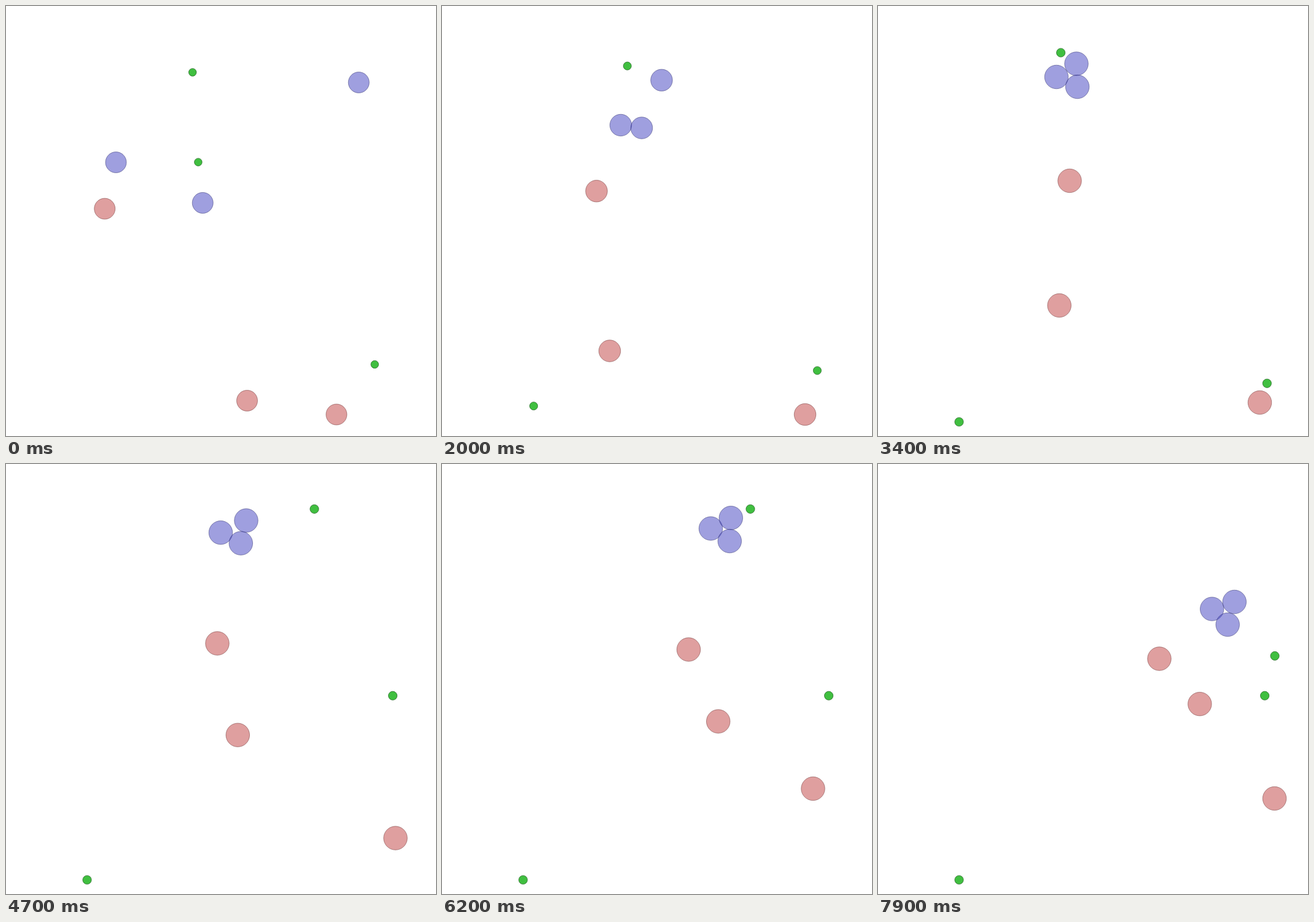
Recreate the animation shown at these times as an HTML page with a canvas. Size 700 px wide and 700 px high, loop 8000 ms.

```html
<!DOCTYPE html>
<html lang="en">
<head>
<meta charset="utf-8">
<title>Agents and landmarks</title>
<style>
  html, body { margin: 0; width: 100%; height: 100%; overflow: hidden; background: #fff; }
  canvas { display: block; width: 100vw; height: 100vh; }
</style>
</head>
<body>
<canvas id="stage" width="700" height="700"></canvas>
<script>
const LOOP = 8000, STEP = 100, MID = 350, REACH = 315;
const ctx = document.getElementById('stage').getContext('2d');

// Positions are pixels from the centre at full zoom.
const blueTimes = [0, 1200, 2000, 3400, 4100, 4700, 5400, 6200, 6600, 7200, 7900];
const redTimes = [0, 1200, 2000, 3400, 4700, 6200, 7900];
const driftTimes = [0, 900, 1200, 2000, 2700, 3400, 3600, 4500, 4700, 5400, 6200, 6600, 7200, 7900];

const BLUE = '64,64,191', RED = '191,64,64', GREEN = '64,191,64';

const agents = [
  { rgb: RED, t: redTimes,
    x: [-214.3, -160.9, -106.9, -38, -6, 51.5, 108],
    y: [-22.6, -42.7, -52.9, -65.5, -58, -48, -33] },
  { rgb: RED, t: redTimes,
    x: [48.1, -43.3, -83.6, -54.8, 27.3, 99.7, 173.8],
    y: [331.1, 278.8, 229.6, 137.5, 91.2, 69, 40.7] },
  { rgb: RED, t: driftTimes,
    x: [212.8, 232, 240.6, 261.7, 267, 271.5, 274.7, 284.7, 284, 270.7, 254, 256, 270, 295.5],
    y: [356.6, 333, 339, 342, 320.8, 295.5, 290.7, 268.7, 259, 217.7, 178.5, 174, 179, 194.5] },
  { rgb: BLUE, t: blueTimes,
    x: [-193.6, -81.8, -64.1, -59.5, -61.5, -0.5, 58, 87.5, 91, 136, 193.7],
    y: [-108.1, -104.7, -169.4, -234.5, -241, -238.3, -243, -245, -246, -191, -114] },
  { rgb: BLUE, t: blueTimes,
    x: [253.9, 61.9, 8.1, -27, -30.5, 41, 97, 120.3, 127, 171, 230.3],
    y: [-255.3, -249.4, -248.9, -256, -259, -258, -260.7, -262.2, -264, -204.7, -125.5] },
  { rgb: BLUE, t: blueTimes,
    x: [-33.7, -33.4, -27.1, -25.4, -26, 32.3, 89, 118.3, 122, 163, 219.2],
    y: [-33.4, -83.6, -164.5, -218.5, -222, -221, -223, -224.5, -226, -168, -88.5] }
];

// A landmark jumps elsewhere once an agent touches it.
const landmarks = [
  { from: 0, to: 4100, x: -52.4, y: -274 },
  { from: 0, to: 1200, x: -42, y: -108.5 },
  { from: 0, to: 3700, x: 283.3, y: 264.3 },
  { from: 1200, to: LOOP, x: -218, y: 327 },
  { from: 3700, to: LOOP, x: 279.6, y: 27.2 },
  { from: 4100, to: 6600, x: 152, y: -276.7 },
  { from: 6600, to: LOOP, x: 296, y: -37.6 }
];

const secant = (t, v, i) => (v[i + 1] - v[i]) / (t[i + 1] - t[i]);

function slope(t, v, i) {
  if (i === 0) return 0;
  if (i === t.length - 1) return secant(t, v, i - 1);
  const a = secant(t, v, i - 1), b = secant(t, v, i);
  if (a * b <= 0) return 0;
  const h = t[i] - t[i - 1], k = t[i + 1] - t[i];
  const mean = Math.abs((a * k + b * h) / (h + k));
  return Math.sign(a) * Math.min(mean, 2 * Math.abs(a), 2 * Math.abs(b));
}

// Monotone cubic through the keys
function sample(t, v, now) {
  let i = 0;
  while (i < t.length - 2 && now >= t[i + 1]) i++;
  const h = t[i + 1] - t[i], u = (now - t[i]) / h, w = 1 - u;
  return v[i] * (1 + 2 * u) * w * w + v[i + 1] * (3 - 2 * u) * u * u +
    h * u * w * (slope(t, v, i) * w - slope(t, v, i + 1) * u);
}

function disc(x, y, r, zoom, rgb, alpha, edge) {
  ctx.beginPath();
  ctx.arc(MID + x * zoom, MID + y * zoom, r * zoom, 0, 2 * Math.PI);
  ctx.fillStyle = `rgba(${rgb},${alpha})`;
  ctx.fill();
  const dark = rgb.split(',').map(c => c >> 1);
  ctx.strokeStyle = `rgba(${dark},${edge})`;
  ctx.stroke();
}

function draw(now) {
  const spots = agents.map(a => ({
    rgb: a.rgb, x: sample(a.t, a.x, now), y: sample(a.t, a.y, now)
  }));
  // Zoom out just enough to keep every agent in view.
  const far = Math.max(...spots.map(p => Math.max(Math.abs(p.x), Math.abs(p.y))));
  const zoom = Math.min(1, REACH / far);

  ctx.fillStyle = '#fff';
  ctx.fillRect(0, 0, 700, 700);
  ctx.lineWidth = 1;
  for (const p of spots) disc(p.x, p.y, 19.25, zoom, p.rgb, 0.5, 0.45);
  for (const m of landmarks) {
    if (now >= m.from && now < m.to) disc(m.x, m.y, 7.1, zoom, GREEN, 1, 0.7);
  }
}

const start = performance.now();
function tick() {
  const now = (performance.now() - start) % LOOP;
  draw(Math.floor(now / STEP) * STEP);
  requestAnimationFrame(tick);
}
tick();
</script>
</body>
</html>
```
